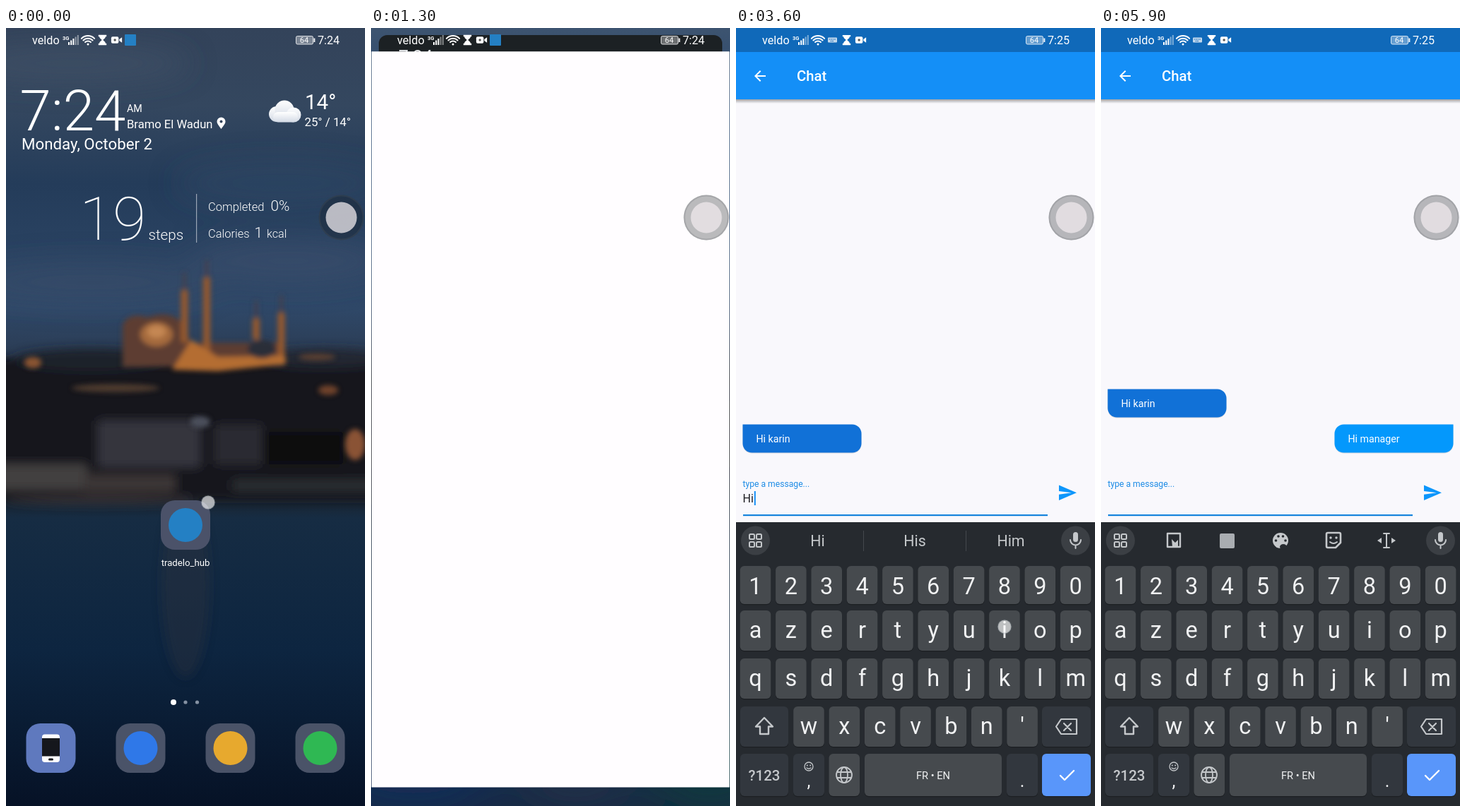
Recreate the animation shown at these times as an HTML page. Size 508 by 1102 pixels, loop 6 s.

```html
<!DOCTYPE html>
<html lang="en">
<head>
<meta charset="utf-8">
<title>Chat notification</title>
<style>
html, body { margin: 0; width: 100%; height: 100%; overflow: hidden; background: #0c1c30; }
svg { display: block; width: 100%; height: 100%; font-family: Roboto, "Open Sans", sans-serif; }
text { white-space: pre; }
</style>
</head>
<body>
<svg id="stage" viewBox="0 0 508 1102"></svg>
<script>
const LOOP = 6000, STEP = 50, KB = 402;
const BLUE = '#2480c4';

// Drawing helpers
const text = (x, y, size, s, o = '') => `<text x="${x}" y="${y}" font-size="${size}" ${o}>${s}</text>`;
const mid = (x, y, size, s, o = '') => text(x, y, size, s, 'text-anchor="middle" ' + o);
const rect = (x, y, w, h, r, fill, o = '') => `<rect x="${x}" y="${y}" width="${w}" height="${h}" rx="${r}" fill="${fill}" ${o}/>`;
const disc = (x, y, r, fill, o = '') => `<circle cx="${x}" cy="${y}" r="${r}" fill="${fill}" ${o}/>`;
const oval = (x, y, rx, ry, fill, o = '') => `<ellipse cx="${x}" cy="${y}" rx="${rx}" ry="${ry}" fill="${fill}" ${o}/>`;
const fillPath = (d, fill, o = '') => `<path d="${d}" fill="${fill}" ${o}/>`;
const line = (d, color, w, o = '') => `<path d="${d}" fill="none" stroke="${color}" stroke-width="${w}" stroke-linecap="round" stroke-linejoin="round" ${o}/>`;
const group = (id, body, o = '') => `<g id="${id}" ${o}>${body}</g>`;
const at = (x, y, body, more = '') => `<g transform="translate(${x} ${y}) ${more}">${body}</g>`;
const grad = (id, stops) => `<linearGradient id="${id}" x1="0" y1="0" x2="0" y2="1">` +
  stops.map(([o, c]) => `<stop offset="${o}" stop-color="${c}"/>`).join('') + '</linearGradient>';
const blur = (id, n) => `<filter id="${id}" x="-30%" y="-30%" width="160%" height="160%"><feGaussianBlur stdDeviation="${n}"/></filter>`;

// Icons
const wifi = (x, y, s, c, w) => disc(x, y - w * .5, w * .75, c) + [.42, .7, .98].map(k => {
  const r = s * k, h = r * .72;
  return line(`M${x - h} ${y - h}A${r} ${r} 0 0 1 ${x + h} ${y - h}`, c, w);
}).join('');
const glass = (x, y, c, k = 1) => at(x, y, fillPath('M-6 -7.5H6V-5H4.5C4.5 -2 1 -1 1 0S4.5 2 4.5 5H6V7.5H-6V5H-4.5C-4.5 2 -1 1 -1 0S-4.5 -2 -4.5 -5H-6Z', c), `scale(${k})`);
const video = (x, y, c, k = 1, hole = '#555') => at(x, y,
  rect(-8, -5, 11, 10, 2, c) + fillPath('M4 -1L8 -4V4L4 1Z', c) + disc(-2.5, 0, 1.8, hole), `scale(${k})`);
const sun = (x, y, r, c) => disc(x, y, r, 'none', `stroke="${c}" stroke-width="2"`) +
  [...Array(8)].map((_, i) => {
    const a = i * Math.PI / 4, u = Math.cos(a), v = Math.sin(a);
    return line(`M${x + u * (r + 4)} ${y + v * (r + 4)}L${x + u * (r + 6.5)} ${y + v * (r + 6.5)}`, c, 2);
  }).join('');
const gear = (x, y, c) => {
  const pts = [...Array(72)].map((_, i) => {
    const a = i * Math.PI / 36, r = 12.8 + 1.9 * Math.tanh(2.5 * Math.cos(6 * a + Math.PI));
    return `${(x + r * Math.sin(a)).toFixed(1)} ${(y + r * Math.cos(a)).toFixed(1)}`;
  });
  return line(`M${pts.join('L')}Z`, c, 2) + disc(x, y, 5, 'none', `stroke="${c}" stroke-width="2"`);
};
const bell = 'M12 22c1.1 0 2-.9 2-2h-4c0 1.1.9 2 2 2zM18 16v-5c0-3.1-1.6-5.6-4.5-6.3V4c0-2-3-2-3 0v.7C7.6 5.4 6 7.9 6 11v5l-2 2v1h16v-1z';
const plane = 'M21 16v-2l-8-5V3.5c0-2-3-2-3 0V9l-8 5v2l8-2.5V19l-2 1.5V22l3.5-1 3.5 1v-1.5L13 19v-5.5z';

const status = (clock, extra, appIcon) => {
  const s = extra ? 20 : 0;
  const bars = [4, 6.5, 9, 11.5, 14].map((h, i) => rect(88 + i * 3.2, 24 - h, 2, h, 0, '#fff', i > 2 ? 'opacity=".45"' : '')).join('');
  return `<g fill="#fff">` + text(37, 23, 16.2, 'veldo') + text(80, 16.5, 7.5, '3G', 'font-weight="700"') + bars +
    wifi(116, 24, 13, '#fff', 2) +
    (extra ? rect(130, 13.5, 13, 7, 1, '#fff', 'opacity=".75"') + line('M132 16h9M134 18.5h5', '#1069b9', 1, 'stroke-dasharray="1 1.5"') : '') +
    glass(136.5 + s, 17, '#fff', .95) + video(156.5 + s, 17, '#fff', .95) + (appIcon ? rect(168, 9, 16, 16, 1, BLUE) : '') +
    rect(410.5, 11.5, 24, 11.5, 2, 'rgba(255,255,255,.35)', 'stroke="#fff" stroke-width="1" stroke-opacity=".8"') +
    rect(435.5, 14.5, 1.8, 5.5, 0, '#fff') + mid(422, 21.3, 11, '64') + text(441, 23, 16.1, clock) + '</g>';
};

// Home screen
const tower = (x, y, h) => rect(x - 5, y, 10, h, 4, '#94592f') + rect(x - 2, y - 24, 4, 26, 2, '#4a4148');
const wallpaper = rect(0, 0, 508, 1102, 0, 'url(#sky)') +
  `<g filter="url(#b20)">` + oval(90, 50, 170, 26, '#47566d', 'opacity=".5"') + oval(390, 220, 150, 30, '#3b4f6c', 'opacity=".4"') +
  oval(120, 360, 180, 26, '#3c506c', 'opacity=".5"') + oval(400, 330, 140, 30, '#405370', 'opacity=".5"') + '</g>' +
  `<g filter="url(#b8)">` + rect(-30, 468, 570, 200, 0, '#17191f') + oval(120, 470, 110, 16, '#1c212b') + oval(450, 468, 90, 14, '#232630') +
  rect(130, 556, 145, 66, 4, '#34363e') + rect(295, 562, 68, 56, 4, '#2a2b32') + rect(365, 572, 112, 46, 4, '#0b0c11') +
  rect(-10, 618, 125, 36, 4, '#42403f') + rect(110, 632, 130, 26, 4, '#3b3534') + rect(320, 640, 200, 16, 4, '#2c2d33') +
  oval(254, 790, 34, 130, '#34363f', 'opacity=".35"') + oval(130, 668, 130, 7, '#4a4140', 'opacity=".5"') + '</g>' +
  `<g filter="url(#b4)">` + fillPath('M165 480V420Q175 402 200 410Q235 398 250 420L262 446H392V478Z', '#5d3e30') +
  oval(213, 434, 23, 17, '#a56a3c') + oval(213, 430, 13, 9, '#c58752') + tower(252.5, 370, 76) + tower(284, 352, 108) + tower(354, 410, 32) + tower(389.5, 402, 66) +
  fillPath('M235 484L262 442L300 466L395 464L396 476L300 486Z', '#b46d31') + oval(362, 455, 20, 13, '#2c2f38') +
  oval(38, 474, 12, 8, '#8a5532') + oval(456, 513, 14, 7, '#6f4229') + oval(494, 590, 14, 22, '#8a5334') +
  oval(155, 510, 62, 6, '#4e3a2f') + oval(275, 558, 14, 8, '#4b505c') + oval(440, 466, 26, 5, '#5a4033') + '</g>';

const tile = (x, y, fill) => rect(x - 35, y - 35, 70, 70, 20, fill);
const home = wallpaper + status('7:24', false, true) + '<g fill="#fff">' +
  text(19.5, 145, 80, '7:24', 'font-weight="300"') + text(171, 119, 14.3, 'AM') + text(171, 142, 16.6, 'Bramo El Wadun') +
  fillPath('M304.500 143C301 138 298.500 135.500 298.500 132.500A6 6 0 0 1 310.500 132.500C310.500 135.500 308 138 304.500 143Z', '#fff') + disc(304.5, 132.5, 2, '#34445c') +
  text(22, 172, 22.3, 'Monday, October 2') +
  `<g fill="url(#cloud)">${disc(383, 122, 11, 'url(#cloud)')}${disc(394, 116, 13.5, 'url(#cloud)')}${disc(407, 123, 10.5, 'url(#cloud)')}${rect(378, 119, 35, 14.5, 7, 'url(#cloud)')}</g>` +
  text(423, 115, 29.5, '14°') + text(422.5, 139, 16.8, '25° / 14°') +
  '<g font-weight="300">' + text(104, 300, 86, '19', 'font-weight="100"') + text(201.5, 300, 20.6, 'steps') +
  rect(269, 235, 1.2, 69, 0, '#9aa5b5') + text(286, 259, 16.6, 'Completed') + text(374.5, 259, 20.8, '0%') +
  text(286, 297, 16.5, 'Calories') + text(351.5, 297, 20.8, '1') + text(369, 297, 16.2, 'kcal') + '</g>' +
  tile(254, 704, '#4b5269') + disc(254, 704, 24, BLUE) + mid(254, 762, 13.2, 'tradelo_hub') +
  disc(237, 955, 4, '#fff') + disc(254, 955, 2.6, '#8592a3') + disc(270.5, 955, 2.6, '#8592a3') +
  tile(63.5, 1020, '#5f79be') + rect(51, 1000.5, 25, 39.5, 4, '#fff') + rect(51, 1006, 25, 25.5, 0, '#15171c') + rect(60, 1034.5, 7, 3, 1.5, '#15171c') +
  [190.5, 317.5, 444.5].map(x => tile(x, 1020, '#4a5368')).join('') +
  disc(190.5, 1020, 24, '#2f78e8') + disc(317.5, 1020, 24, '#e7a92e') + disc(444.5, 1020, 24, '#2fb853') + '</g>';

// Notification shade
const backdrop = rect(0, 0, 508, 1102, 0, 'url(#dusk)') + `<g filter="url(#b40)">` +
  oval(250, 455, 95, 55, '#33262a', 'opacity=".8"') + oval(440, 575, 110, 60, '#080c13') + oval(40, 600, 90, 60, '#141820') +
  oval(250, 705, 62, 85, '#20354f') + oval(480, 1040, 90, 70, '#0c3b3c') + oval(60, 1050, 120, 60, '#152d58') + oval(290, 1060, 90, 40, '#26334a') + '</g>';
const GREY = '#77797d';
const panel = rect(11, 7, 486, 260, 12, '#1c2023', 'opacity=".98"') +
  text(39, 47, 25, '7:24', 'fill="#e3e5e8"') + text(99, 47, 21.8, 'AM', 'fill="#e3e5e8"') + text(39, 78.5, 19.6, 'Monday, October 2', 'fill="#a0a3a8"') +
  line('M371 66L373 59L391 41Q394 39 396 42Q398 44 395 47L377 64ZM381 66H398', '#a0a2a6', 2) + gear(446, 52, '#a0a2a6') +
  [75, 164, 253, 342, 431].map((x, i) => disc(x, 137, 34, i < 2 ? '#93c4fe' : '#343538')).join('') +
  wifi(75, 149, 22, '#fff', 3.6) + at(164, 137, fillPath(bell, '#fff'), 'scale(1.6) translate(-12 -12.500)') +
  line('M249 150V124L243 131M257 124V150L263 143', GREY, 3) + at(342, 137, fillPath(plane, GREY), 'rotate(90) scale(1.55) translate(-11.500 -12)') +
  fillPath('M421 122H441V129L437 135V153H425V135L421 129Z', GREY) + line('M422 127.500H440', '#343538', 2) + disc(431, 141, 2, '#343538') +
  sun(56.5, 210.5, 6, '#85888c') + sun(452, 210.5, 8, '#85888c') +
  rect(102, 209, 304, 3, 1.5, '#303437') + rect(102, 209, 18, 3, 1.5, '#5aa0f4') + disc(122, 210.5, 17, '#fff') + rect(236, 251.5, 36, 2.5, 1, '#55595d');
const CARD = '#d6d6dc';
const strip = rect(11, 276, 486, 51, 10, CARD) + glass(43.5, 302, '#15151a', 1.15) + video(69, 302, '#606066', 1.15, CARD) + rect(84.5, 291.5, 20, 20, 1, BLUE);
const small = (y, title, note, x) => text(67.5, y, 14.7, title, 'fill="#26262c"') + (note ? text(x, y, 14.7, note, 'fill="#26262c"') : '');
const bold = (y, s) => text(33.5, y, 16.8, s, 'font-weight="500" fill="#17171c"');
const cards = [
  rect(11, 281, 486, 103, 10, CARD) + glass(45, 310, '#7a8cab', 1.35) + small(316, 'Restful leisure', 'Just now', 174.5) + bold(357, '9 h 21 min of screen time remaining'),
  rect(11, 395, 486, 113, 10, '#d5d1d6') + video(45, 424, '#ee6a55', 1.35, '#b33d32') + small(429, 'Screen recording') + bold(475, 'Recording screen') + rect(446, 457, 22.5, 23, 4, '#14131a')
].map((c, i) => group('card' + i, c)).join('') +
  text(474, 701, 16.9, 'Manage notifications', 'id="manage" text-anchor="end" font-weight="500" fill="#fff"');
const trash = disc(254, 978.5, 28, 'rgba(150,150,152,.85)') + fillPath('M243 971H265L263 994H245Z', '#fff') +
  rect(240, 966, 28, 3, 1, '#fff') + rect(248, 963, 12, 4, 1, '#fff') + line('M250.500 976V988M257.500 976V988', '#8b8b8d', 2);
const launch = rect(11, 519, 486, 170, 10, '#fffdff', 'id="sheet"') + group('sheetText',
  rect(34, 537, 22, 22, 1, BLUE) + small(553.5, 'tradelo_hub', 'Just now', 152) + bold(594, 'new message') + text(33.5, 620, 17, 'Hi karin', 'fill="#44444a"'));

// Chat and keyboard
const bubble = (x, y, w, right, fill, s) => {
  const d = right ? `M${x + 13} ${y}H${x + w}V${y + 27}a13 13 0 0 1 -13 13H${x + 13}a13 13 0 0 1 -13 -13V${y + 13}a13 13 0 0 1 13 -13Z`
    : `M${x} ${y}H${x + w - 13}a13 13 0 0 1 13 13V${y + 27}a13 13 0 0 1 -13 13H${x + 13}a13 13 0 0 1 -13 -13Z`;
  return fillPath(d, '#000', 'opacity=".12" transform="translate(0 1)"') + fillPath(d, fill) + text(x + 19, y + 25, 14.2, s, 'fill="#fff"');
};
const chatBar = rect(0, 101, 508, 6, 0, 'url(#shadow)') + rect(0, 34, 508, 67, 0, '#148ff7') + rect(0, 0, 508, 34, 0, '#1069b9') +
  group('stPlain', status('7:25', false, false)) + group('stTyping', status('7:25', true, false)) +
  at(22, 56, fillPath('M20 11H7.800l5.600-5.600L12 4l-8 8 8 8 1.400-1.400L7.800 13H20z', '#fff')) + text(86, 75, 20.3, 'Chat', 'font-weight="500" fill="#fff"');
const compose = group('first', bubble(9.5, 963.5, 168, false, '#1171d7', 'Hi karin')) + group('reply', bubble(330.5, 963.5, 168, true, '#0498fc', 'Hi manager')) +
  text(9.5, 1065, 16.1, 'type a message...', 'id="label"') + text(9.5, 1074, 16, '', 'id="typed" fill="#1c1c20"') +
  rect(0, 1058, 2, 20, 0, '#148ff7', 'id="caret"') + rect(10, 1091.5, 431, 1.2, 0, '#8d8c90', 'id="rule"') +
  at(454.6, 1046, fillPath('M2 21L23 12 2 3 2 10l15 2-15 2z', '#97969a', 'id="send"'), 'scale(1.190)');

const KEY = '#464a4e', DIM = '#32373e', INK = '#f1f2f3', SOFT = '#c5c8cb';
const keyRow = (keys, x0, y, h, base, cls) => [...keys].map((k, i) => {
  const x = x0 + i * 50.35;
  return rect(x - 21.8, y + 1.2, 43.6, h, 6, '#1c1f23') + rect(x - 21.8, y, 43.6, h, 6, KEY) + mid(x, base, 32.5, k, `class="${cls}" fill="${INK}"`);
}).join('');
const wide = (x, y, w, h, fill) => rect(x, y + 1.2, w, h, 6, '#1c1f23') + rect(x, y, w, h, 6, fill);
const face = (x, y, r) => disc(x, y, r, 'none', `stroke="${SOFT}" stroke-width="1.3"`) + disc(x - 2.2, y - 1.5, 1, SOFT) + disc(x + 2.2, y - 1.5, 1, SOFT) + line(`M${x - 3} ${y + 2}q3 2.500 6 0`, SOFT, 1.3);
const tools = line('M94 716H112V735H94Z', SOFT, 2.4) + fillPath('M100 724L105 729L109 725V735H101Z', SOFT) + rect(168, 716, 21, 21, 2, '#a9adb1') +
  disc(254, 726, 11, SOFT) + [[247.5, 726], [251, 720], [257.5, 720], [261, 726]].map(([x, y]) => disc(x, y, 1.8, '#262a2f')).join('') + oval(258, 735, 5, 4, '#262a2f') +
  line('M321 715H337Q339 715 339 717V729L332 736H321Q319 736 319 734V717Q319 715 321 715Z', SOFT, 2.6) + disc(325, 722, 1.7, SOFT) + disc(333, 722, 1.7, SOFT) + line('M324 728q5 4 10 0', SOFT, 2) +
  line('M400 716H408M404 716V736M400 736H408', SOFT, 2) + fillPath('M397 722V730L391 726ZM411 722V730L417 726Z', SOFT);
const hints = [115.5, 253, 389].map(x => mid(x, 734, 21.4, '', `class="hint" fill="${SOFT}"`)).join('') + rect(180, 712, 1, 29, 0, '#44484d') + rect(325, 712, 1, 29, 0, '#44484d');
const keyboard = rect(0, 700, 508, 402, 0, '#262a2f') + disc(27.5, 726, 20.5, '#3b3f44') + disc(480.5, 726, 20.5, '#3b3f44') +
  [[19, 717], [29, 717], [19, 728], [29, 728]].map(([x, y]) => rect(x, y, 7, 7, 1.5, 'none', `stroke="${SOFT}" stroke-width="2"`)).join('') +
  rect(477, 714, 7, 14, 3.5, SOFT) + line('M473 725a7.500 7.500 0 0 0 15 0M480.500 733V737', SOFT, 2) +
  group('tools', tools) + group('hints', hints) +
  keyRow('1234567890', 27.5, 762, 54, 802, 'num') + keyRow('azertyuiop', 27.5, 825, 57, 863.5, 'key') +
  keyRow('qsdfghjklm', 27.5, 893, 57, 931.5, 'key') + keyRow("wxcvbn'", 103, 961, 57, 999.5, 'key') +
  wide(6, 961, 68, 57, DIM) + wide(433, 961, 69, 57, DIM) +
  line('M40 977L52 989.500H46V1000H34V989.500H28Z', SOFT, 2.4, 'id="shift"') +
  line('M460 979H482V1000H460L453 989.500ZM464 985L474 995M474 985L464 995', SOFT, 2.2) +
  wide(6, 1028, 68, 60, DIM) + wide(81, 1028, 44, 60, DIM) + wide(131.5, 1028, 43.5, 60, KEY) + wide(182, 1028, 194, 60, KEY) + wide(383, 1028, 44, 60, DIM) + wide(433, 1028, 69, 60, '#5996fa') +
  mid(40, 1066, 20.5, '?123', `font-weight="500" fill="${SOFT}"`) + face(103, 1046, 6) + mid(103, 1075, 25, ',', `fill="${INK}"`) + mid(405, 1075, 25, '.', `fill="${INK}"`) +
  disc(153, 1058, 11, 'none', `stroke="${SOFT}" stroke-width="1.8"`) + oval(153, 1058, 5, 11, 'none', `stroke="${SOFT}" stroke-width="1.8"`) + line('M143 1054H163M143 1062H163', SOFT, 1.8) +
  mid(279, 1063.5, 14.6, 'FR • EN', `fill="${INK}"`) + line('M459 1059L465 1065L478 1052', '#fff', 2.4);

document.getElementById('stage').innerHTML = '<defs>' +
  grad('sky', [[0, '#33435a'], [.1, '#34475f'], [.2, '#243c5a'], [.36, '#2f4868'], [.42, '#2b3c54'], [.44, '#1b2029'], [.6, '#1b222b'], [.63, '#162c43'], [.8, '#0d2540'], [1, '#061226']]) +
  grad('dusk', [[0, '#3d5470'], [.14, '#20406a'], [.3, '#213f64'], [.38, '#1b3050'], [.45, '#11161f'], [.56, '#11161e'], [.66, '#081a30'], [.8, '#031a35'], [.9, '#10294a'], [1, '#142943']]) +
  grad('cloud', [[0, '#ffffff'], [1, '#d3dae5']]) +
  grad('shadow', [[0, 'rgba(0,0,0,.35)'], [1, 'rgba(0,0,0,0)']]) +
  blur('b4', 3.5) + blur('b8', 7) + blur('b20', 20) + blur('b40', 36) + '</defs>' +
  group('home', home) + group('backdrop', backdrop) + group('panel', panel) + group('strip', strip) + group('cards', cards) + group('trash', trash) +
  group('topStatus', status('7:24', false, true)) + group('launch', launch) +
  group('app', rect(0, 0, 508, 1102, 0, '#f9f8fc') + group('compose', compose) + chatBar + group('keyboard', keyboard)) +
  disc(474.5, 268.5, 32, 'rgba(20,22,26,.29)') + disc(474.5, 268.5, 31, 'none', 'stroke="rgba(90,95,100,.22)" stroke-width="2"') + disc(474.5, 268.5, 22, 'rgba(240,234,238,.74)') +
  group('touch', disc(0, 0, 17, 'rgba(255,255,255,.13)', 'id="halo"') + disc(0, 0, 13, 'rgba(255,255,255,.65)', 'id="dot" stroke="rgba(120,130,140,.25)" stroke-width="2"'));

// Timeline
const $ = Object.fromEntries([...document.querySelectorAll('[id]')].map(e => [e.id, e]));
const keys = [...document.querySelectorAll('.key')].map(el => [el, el.textContent]);
const hintEls = [...document.querySelectorAll('.hint')];

// start, end, x, y and, for drags, final x, y
const touches = [
  [-100, 0, 286, 672], [200, 800, 348, 8, 378, 400], [1050, 1200, 306, 613], [2450, 2500, 190, 1060],
  [3250, 3300, 39, 986], [3400, 3450, 280, 915], [3550, 3600, 380, 848], [3750, 3850, 321, 1077],
  [4100, 4200, 481, 915], [4350, 4450, 30, 846], [4600, 4700, 354, 976], [4750, 4800, 30, 848],
  [4900, 4950, 228, 915], [5000, 5050, 128, 848], [5100, 5150, 178, 848], [5400, 5500, 469, 658]
];
const typing = [
  [3000, ''], [3450, 'H', 'H|He|Hi'], [3600, 'Hi', 'Hi|His|Him'], [3800, 'Hi ', 'I|the|to'], [4200, 'Hi m', 'm|M|my'],
  [4450, 'Hi ma', 'ma|may|man'], [4700, 'Hi man', 'man|many|Man'], [4800, 'Hi mana', 'mana|manage|manager'], [4950, 'Hi manag', 'manage|manager|managed'],
  [5050, 'Hi manage', 'manage|manager|managed'], [5150, 'Hi manager', 'manager|managers|Manager'], [5400, '']
];

const ramp = (t, a, b) => Math.min(1, Math.max(0, (t - a) / (b - a)));
const ease = (t, a, b) => 1 - (1 - ramp(t, a, b)) ** 3;
const mix = (a, b, p) => a + (b - a) * p;
const set = (el, o) => { for (const k in o) el.setAttribute(k, o[k]); };
const show = (el, o) => set(el, { opacity: +o, visibility: o > 0 ? 'visible' : 'hidden' });
const move = (el, y) => set(el, { transform: `translate(0 ${y})` });

function drawShade(t) {
  const pull = ease(t, 200, 650), open = ease(t, 850, 1050), live = t < 1500;
  show($.home, t < 1500);
  show($.backdrop, live && ramp(t, 200, 500));
  show($.panel, live && ramp(t, 150, 300));
  move($.panel, mix(-275, 0, pull) + 3 * open);
  show($.strip, live && ramp(t, 200, 400) * (1 - ramp(t, 850, 950)));
  move($.strip, mix(-330, 0, pull) + 5 * open);
  show($.cards, live && open);
  move($.card0, -5 * (1 - open));
  move($.card1, -90 * (1 - open));
  move($.manage, -150 * (1 - open));
  show($.trash, live && ramp(t, 500, 900));
  show($.topStatus, live && t >= 1100);
  move($.topStatus, mix(-22, 0, ramp(t, 1150, 1300)));

  const grow = ease(t, 1150, 1400);
  show($.launch, t < 1800 && open);
  move($.launch, -150 * (1 - open));
  set($.sheet, { x: mix(11, 0, grow), y: mix(519, 0, grow), width: mix(486, 508, grow), height: mix(170, 1102, grow),
    rx: 10 * (1 - grow), fill: t < 1100 ? '#d5d1d4' : '#fffdff' });
  show($.sheetText, t < 1100 ? 1 : t < 1200 ? .2 : 0);
}

function drawChat(t) {
  show($.app, ramp(t, 1450, 1700));
  const up = ease(t, 2500, 2800), focus = t >= 2500, lift = ease(t, 2500, 2700);
  move($.compose, -KB * up);
  move($.keyboard, KB * (1 - up));
  show($.keyboard, focus);
  show($.stPlain, t < 2550);
  show($.stTyping, t >= 2550);
  show($.first, ramp(t, 1900, 2050));
  show($.reply, t >= 5550);
  move($.first, t >= 5550 ? -50 : 0);
  set($.label, { y: mix(1065, 1052, lift), 'font-size': mix(16.1, 12.15, lift), fill: focus ? '#1e8ce6' : '#626164' });
  set($.rule, { height: focus ? 2.2 : 1.2, y: focus ? 1091 : 1091.5, fill: focus ? '#1583dc' : '#8d8c90' });
  set($.send, { fill: t >= 3450 ? '#0d96fb' : '#97969a' });

  const now = typing.filter(e => e[0] <= t).pop() || [Infinity, ''];
  $.typed.textContent = now[1];
  show($.caret, t >= now[0] && Math.floor((t - now[0]) / 500) % 2 === 0);
  set($.caret, { x: 10.5 + (now[1] ? $.typed.getComputedTextLength() : 0) });
  const words = now[2] || (t >= 5400 && t < 5500 ? 'manager|managers|Manager' : '');
  show($.tools, !words);
  show($.hints, !!words);
  hintEls.forEach((el, i) => el.textContent = words.split('|')[i] || '');
  const caps = t >= 3300 && t < 3450;
  keys.forEach(([el, k]) => el.textContent = caps ? k.toUpperCase() : k);
  set($.shift, { fill: caps ? SOFT : 'none' });
}

function drawTouch(t) {
  const hit = touches.find(([a, b]) => t >= a && t < b + 50);
  show($.touch, !!hit);
  if (!hit) return;
  const [a, b, x, y, x1 = x, y1 = y] = hit, p = ramp(t, a, b), gone = t >= b;
  set($.touch, { transform: `translate(${mix(x, x1, p)} ${mix(y, y1, p)})` });
  set($.dot, { r: gone ? 9.5 : 13 });
  show($.halo, !gone);
}

function draw(ms) {
  const t = Math.floor((ms % LOOP) / STEP) * STEP;
  drawShade(t);
  drawChat(t);
  drawTouch(t);
}

const start = performance.now();
function tick() {
  draw(performance.now() - start);
  requestAnimationFrame(tick);
}
draw(0);
requestAnimationFrame(tick);
</script>
</body>
</html>
```
